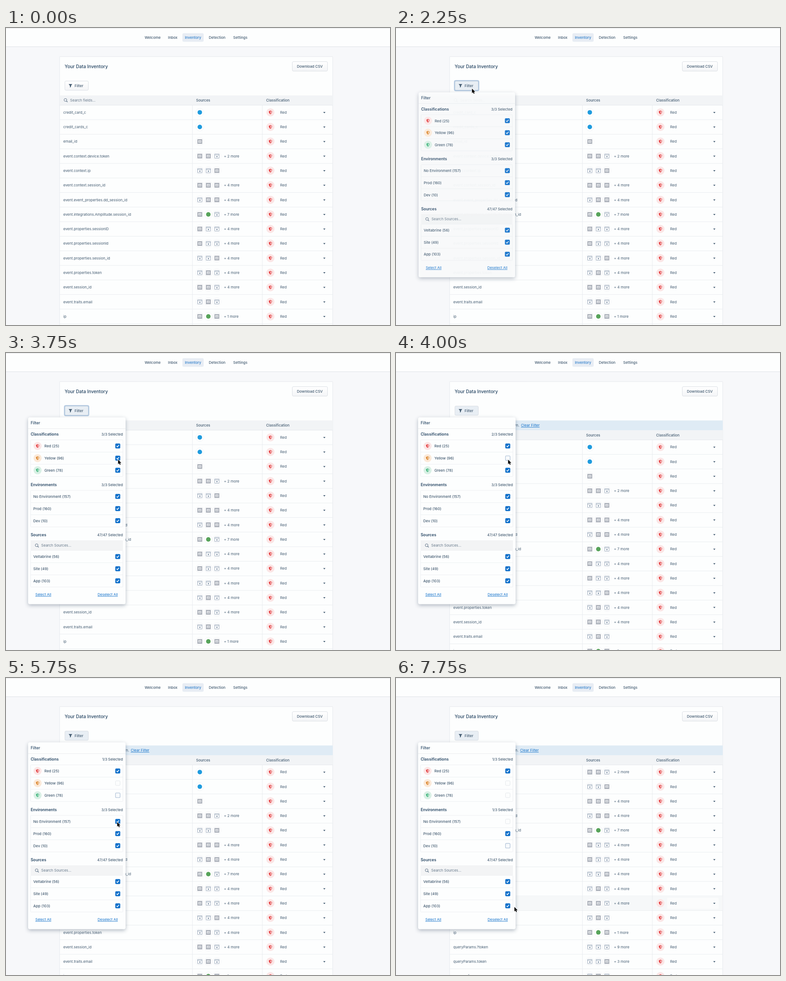
These frames come from a looping animation (851 px wide and 658 px high, 8 s). An HTML page with a canvas:

```html
<!DOCTYPE html>
<html lang="en">
<head>
<meta charset="utf-8">
<title>Data Inventory</title>
<style>
html, body { margin: 0; width: 100%; height: 100%; overflow: hidden; background: #f7f8fa; }
canvas { display: block; width: 851px; height: 658px; }
</style>
</head>
<body>
<canvas id="stage"></canvas>
<script>
const W = 851, H = 658, LOOP = 8000, STEP = 250;
const canvas = document.getElementById('stage');
const ctx = canvas.getContext('2d');
const dpr = window.devicePixelRatio || 1;
canvas.width = W * dpr;
canvas.height = H * dpr;

const INK = '#425a70', DARK = '#234361', BLUE = '#1070ca', WHITE = '#fdfefe', LINE = '#e6e9ed';
const ROW_H = 32.29;

// name | source icons | extra count
const FIELDS = [
  'credit_card_c|s', 'credit_cards_c|s', 'email_id|g',
  'event.context.device.token|ggw|2', 'event.context.ip|wwg',
  'event.context.session_id|ggg|4', 'event.event_properties.dd_session_id|wgg|4',
  'event.integrations.Amplitude.session_id|gnw|7', 'event.properties.sessionID|gww|4',
  'event.properties.sessionId|gww|4', 'event.properties.session_id|wwg|4',
  'event.properties.token|wgw|4', 'event.session_id|ggw|4', 'event.traits.email|wgw',
  'ip|gng|1', 'queryParams.?token|www|9', 'queryParams.token|wwg|3', 'sources.fname|wgw'
].map(s => s.split('|'));

const RED = ['#fbe6e6', '#e5484a'], YELLOW = ['#fbe9d8', '#dd8a35'], GREEN = ['#d9f0e5', '#47b881'];

// step, x, y
const PATH = [
  [1, 619, 22], [2, 520, 75], [3, 330, 140], [4, 214, 163], [5, 170, 134], [7, 170, 134],
  [8, 168, 134], [9, 168, 134], [10, 208, 140], [11, 253, 158], [12, 262, 178],
  [14, 252, 225], [15, 248, 236], [17, 248, 236], [19, 247, 262], [20, 247, 262],
  [22, 247, 312], [23, 246, 319], [24, 246, 319], [26, 247, 372], [27, 247, 374],
  [28, 248, 384], [31, 262, 507]
];

// steps at which things happen
const PRESS = 8, OPEN = 9, NO_YELLOW = 16, NO_GREEN = 20, NO_ENV = 24, NO_DEV = 27;

function text(str, x, y, { size = 8, weight = 400, color = INK, align = 'left', underline = false } = {}) {
  ctx.font = `${weight} ${size}px Inter, sans-serif`;
  ctx.textAlign = align;
  ctx.fillStyle = color;
  const base = y + size * 0.364;
  ctx.fillText(str, x, base);
  if (underline) ctx.fillRect(x, base + 1.2, ctx.measureText(str).width, 0.8);
}

function rect(x, y, w, h, fill) {
  ctx.fillStyle = fill;
  ctx.fillRect(x, y, w, h);
}

function box(x, y, w, h, r, fill, stroke, lw = 1) {
  ctx.beginPath();
  ctx.roundRect(x, y, w, h, r);
  if (fill) { ctx.fillStyle = fill; ctx.fill(); }
  if (stroke) { ctx.strokeStyle = stroke; ctx.lineWidth = lw; ctx.stroke(); }
}

function disc(x, y, r, fill, stroke) {
  ctx.beginPath();
  ctx.arc(x, y, r, 0, 7);
  if (fill) { ctx.fillStyle = fill; ctx.fill(); }
  if (stroke) { ctx.strokeStyle = stroke; ctx.lineWidth = 0.8; ctx.stroke(); }
}

function poly(points, fill) {
  ctx.beginPath();
  points.forEach(([x, y]) => ctx.lineTo(x, y));
  ctx.closePath();
  ctx.fillStyle = fill;
  ctx.fill();
}

function strokeLine(points, color, lw) {
  ctx.beginPath();
  points.forEach(([x, y], i) => i ? ctx.lineTo(x, y) : ctx.moveTo(x, y));
  ctx.strokeStyle = color;
  ctx.lineWidth = lw;
  ctx.stroke();
}

function shield(x, y, [pale, strong]) {
  disc(x, y, 9, pale);
  ctx.save();
  ctx.translate(x, y);
  ctx.beginPath();
  ctx.moveTo(0, -4.2);
  ctx.quadraticCurveTo(1.8, -2.8, 3.6, -2.5);
  ctx.quadraticCurveTo(3.6, 2, 0, 4.3);
  ctx.quadraticCurveTo(-3.6, 2, -3.6, -2.5);
  ctx.quadraticCurveTo(-1.8, -2.8, 0, -4.2);
  ctx.fillStyle = strong;
  ctx.fill();
  ctx.beginPath();
  ctx.moveTo(0.2, -2.9);
  ctx.quadraticCurveTo(1.4, -2, 2.6, -1.7);
  ctx.quadraticCurveTo(2.3, 1.4, 0.2, 3);
  ctx.fillStyle = pale;
  ctx.fill();
  ctx.restore();
}

function sourceIcon(kind, x, y) {
  disc(x, y, 9, '#ffffff', '#f0f2f4');
  if (kind === 's') disc(x, y, 5, '#1f9bde');
  else if (kind === 'n') disc(x, y, 5, '#57a35a');
  else if (kind === 'g') {
    box(x - 5.5, y - 5.3, 11, 10.6, 1, '#adb2bb');
    box(x - 3.4, y - 2.6, 6.8, 5, 0.5, '#e8eaed');
    rect(x - 2.3, y - 0.6, 1.1, 2, '#adb2bb');
    rect(x - 0.5, y - 1.2, 1.1, 2.6, '#adb2bb');
    rect(x + 1.3, y - 1.2, 1.1, 2.6, '#adb2bb');
  } else {
    box(x - 5, y - 4.8, 10, 9.6, 0.5, '#ffffff', '#8fa0b3', 0.9);
    rect(x - 5, y - 3, 10, 0.9, '#8fa0b3');
    rect(x - 1.2, y, 2.8, 2.4, '#7d90a6');
  }
}

function magnifier(x, y) {
  ctx.beginPath();
  ctx.arc(x - 0.6, y - 0.6, 3.1, 0, 7);
  ctx.strokeStyle = '#5c7085';
  ctx.lineWidth = 1;
  ctx.stroke();
  strokeLine([[x + 1.7, y + 1.7], [x + 4, y + 4]], '#5c7085', 1.3);
}

function button(x, y, w, h, state) {
  let fill = ctx.createLinearGradient(0, y, 0, y + h);
  fill.addColorStop(0, '#ffffff');
  fill.addColorStop(1, '#f4f5f7');
  if (state !== 'idle') fill = '#e8eef4';
  if (state === 'focus') box(x - 0.5, y - 0.5, w + 1, h + 1, 3, null, '#b4cae2', 2);
  box(x + 0.5, y + 0.5, w - 1, h - 1, 2.5, fill, state === 'focus' ? '#a9bfd6' : '#d8dde3', 0.9);
}

function nav() {
  rect(0, 0, W, 41, WHITE);
  rect(0, 0, W, 1, '#e4e6e8');
  rect(0, 41, W, 1, '#dfe3e7');
  box(391, 11.5, 47, 19, 3, '#e8edf4');
  [['Welcome', 325], ['Inbox', 369.5], ['Inventory', 414.5], ['Detection', 468], ['Settings', 519.3]]
    .forEach(([label, x]) => text(label, x, 20.7, {
      weight: 500, align: 'center', color: label === 'Inventory' ? '#2f7fcb' : INK
    }));
}

function tableRow([name, icons, extra], top, hover) {
  const y = top + 16.1;
  if (hover) rect(119.5, top, 604, ROW_H, '#f6f8f9');
  if (hover === 'select') box(601, top + 4, 114, 24.5, 2, '#fbfcfc');
  text(name, 127, y);
  [...icons].forEach((kind, i) => sourceIcon(kind, 429.5 + i * 18.9, y));
  if (extra) text(`+ ${extra} more`, 483, y);
  shield(586, y, RED);
  text('Red', 607.5, y);
  poly([[703, y - 1], [708, y - 1], [705.5, y + 2]], INK);
  rect(119, top + ROW_H - 0.5, 605, 1, '#eaedf0');
}

function card(step) {
  box(118.8, 63.3, 605.2, 700, 1, WHITE, LINE);
  text('Your Data Inventory', 130, 85, { size: 10.15, weight: 500, color: DARK });
  button(634, 74, 79, 22, 'idle');
  text('Download CSV', 673.4, 85, { weight: 500, align: 'center' });

  button(130, 117, 53, 21.5, step < PRESS ? 'idle' : step < NO_YELLOW ? 'focus' : 'active');
  poly([[138.8, 124.2], [146.8, 124.2], [144, 127.9], [144, 130.2], [141.8, 131.9], [141.8, 127.9]], INK);
  text('Filter', 152, 128, { weight: 500 });

  let top = 149.5;
  if (step >= NO_YELLOW) {
    rect(119, top, 605, 21.5, '#dfebf5');
    const x = step < NO_GREEN ? 277 : step < NO_ENV ? 276.4 : 275;
    text('Some of the fields are not shown.', x - 3.6, 160, { align: 'right' });
    text('Clear Filter', x, 160, { color: BLUE, underline: true });
    top += 21.5;
  }
  rect(119, top, 605, 21.5, '#f2f4f6');
  rect(119, top + 21, 605, 1, LINE);
  magnifier(132.3, top + 10.5);
  text('Search fields...', 142, top + 10.5, { color: '#66788a' });
  text('Sources', 421.3, top + 10.6, { weight: 500 });
  text('Classification', 576.5, top + 10.6, { weight: 500 });

  top += 21.3;
  const rows = step < NO_ENV ? FIELDS : FIELDS.slice(3);
  rows.forEach((row, i) => {
    const hover = step === 12 && i === 0 ? 'plain' : step === 31 && i === 9 ? 'select' : '';
    tableRow(row, top + i * ROW_H, hover);
  });
  rect(412.6, top, 0.9, H, LINE);
  rect(567.6, top, 0.9, H, LINE);
}

function checkbox(x, y, on, focus) {
  if (on) {
    box(x - 5.5, y - 5.5, 11, 11, 2, BLUE);
    strokeLine([[x - 2.7, y + 0.1], [x - 0.8, y + 2.1], [x + 2.8, y - 2.2]], '#ffffff', 1.5);
  } else {
    box(x - 5.1, y - 5.1, 10.2, 10.2, 2, focus ? '#f8fafc' : '#fcfdfd', focus ? '#b4c6da' : '#e1e5e9', focus ? 1.3 : 0.9);
  }
}

// items: label, checked, focused, shield colours
function group(title, headY, firstY, total, items, count) {
  text(title, 54.7, headY, { size: 8.7, weight: 600, color: DARK });
  text(`${count}/${total} Selected`, 259, headY + 0.3, { size: 7.8, weight: 500, align: 'right' });
  box(54.5, firstY - 13.5, 204.5, 81, 1, null, '#eceff2', 0.9);
  items.forEach(([label, on, focus, tint], i) => {
    const y = firstY + i * 26.9;
    if (i) rect(54.5, y - 13.7, 204.5, 0.9, '#eceff2');
    if (tint) shield(70, y, tint);
    text(label, tint ? 85 : 60.5, y + 0.3, { size: 8.1, weight: 500 });
    checkbox(247.7, y, on, focus);
  });
}

function popover(step) {
  ctx.save();
  if (step === OPEN) {
    ctx.globalAlpha = 0.93;
    ctx.translate(157, 142);
    ctx.scale(0.99, 0.99);
    ctx.translate(-157, -142);
  }
  ctx.save();
  ctx.shadowColor = 'rgba(50,70,95,0.36)';
  ctx.shadowBlur = 9 * dpr;
  ctx.shadowOffsetY = 3 * dpr;
  box(49, 142.5, 216, 414, 4, WHITE);
  ctx.restore();

  text('Filter', 54.7, 155, { size: 8.7, weight: 500, color: DARK });
  rect(49, 167, 216, 0.9, '#e8ebee');

  const yellow = step < NO_YELLOW, green = step < NO_GREEN, env = step < NO_ENV, dev = step < NO_DEV;
  group('Classifications', 180, 206, 3, [
    ['Red (25)', true, false, RED],
    ['Yellow (96)', yellow, green, YELLOW],
    ['Green (78)', green, env, GREEN]
  ], 1 + yellow + green);
  group('Environments', 291.7, 317.8, 3, [
    ['No Environment (157)', env, dev],
    ['Prod (160)', true],
    ['Dev (10)', dev, true]
  ], 1 + env + dev);
  group('Sources', 403.2, 451, 47, [
    ['Veltabrine (56)', true], ['Site (49)', true], ['App (103)', true]
  ], 47);

  rect(54.5, 415, 204.5, 22.5, '#f3f4f5');
  magnifier(68.5, 426.5);
  text('Search Sources...', 78, 426.3, { color: '#66788a' });
  text('Select All', 65, 534.7, { color: BLUE, underline: true });
  text('Deselect All', 203, 534.7, { color: BLUE, underline: true });
  ctx.restore();
}

function cursor(step) {
  if (step < PATH[0][0]) return;
  const next = PATH.findIndex(p => p[0] >= step);
  const [s1, x1, y1] = PATH[next], [s0, x0, y0] = PATH[Math.max(0, next - 1)];
  const k = s1 > s0 ? (step - s0) / (s1 - s0) : 1;
  const x = x0 + (x1 - x0) * k, y = y0 + (y1 - y0) * k;
  ctx.beginPath();
  [[0, 0], [0, 10], [2.3, 8], [3.9, 11.6], [5.6, 10.9], [4.1, 7.3], [7.2, 7.2]]
    .forEach(([dx, dy]) => ctx.lineTo(x + 0.4 + dx, y + 0.2 + dy));
  ctx.closePath();
  ctx.lineJoin = 'round';
  ctx.strokeStyle = '#ffffff';
  ctx.lineWidth = 1.6;
  ctx.stroke();
  ctx.fillStyle = '#000000';
  ctx.fill();
  ctx.lineJoin = 'miter';
}

const start = performance.now();

function draw() {
  const step = Math.floor(((performance.now() - start) % LOOP) / STEP);
  ctx.setTransform(dpr, 0, 0, dpr, 0, 0);
  rect(0, 0, W, H, '#f7f8fa');
  nav();
  card(step);
  if (step >= OPEN) popover(step);
  cursor(step);
  requestAnimationFrame(draw);
}

draw();
</script>
</body>
</html>
```
